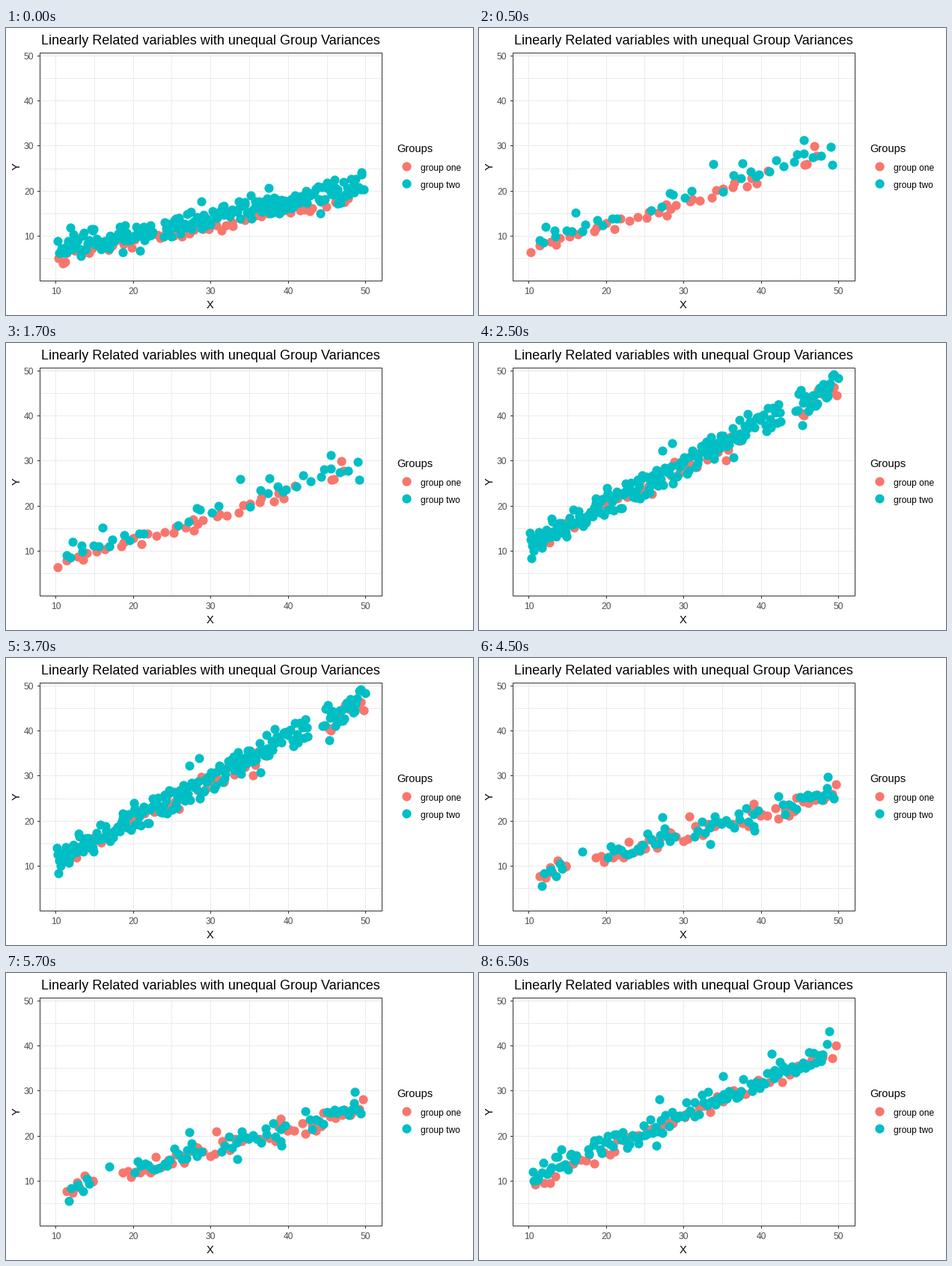
Recreate the animation shown at these times as a matplotlib script. Size 624 px wide and 384 px high, loop 8000 ms.

```python
import matplotlib.pyplot as plt
import numpy as np
from matplotlib.animation import FuncAnimation

W, H, DPI = 624, 384, 96
PX = 72 / DPI  # points per pixel
SALMON, TEAL = "#F8766D", "#00BFC4"
GRID, DARK, GREY = "#EBEBEB", "#333333", "#4D4D4D"
LEFT, RIGHT, TOP, BOTTOM = 45.5, 502.5, 33.5, 338.5
INTERVAL, LOOP, HOLD, LEAD = 500, 8000, 2000, 1500

plt.rcParams["font.family"] = "Liberation Sans"


def x_at(value):
    return 66.5 + 10.36 * (value - 10)


def y_at(value):
    return 278.7 - 6.04 * (value - 10)


def cloud(seed, n, start, end, spread, spans, extremes):
    """Stage positions of n values about a line from x = 10 to x = 50.

    x runs evenly, with jitter, through the spans; extremes are added as they are.
    """
    rng = np.random.default_rng(seed)
    lo, hi = np.array(spans, float).T
    ends = np.cumsum(hi - lo)
    along = (np.arange(n) + rng.random(n)) / n * ends[-1]
    k = np.searchsorted(ends, along, side="right")
    x = hi[k] - ends[k] + along
    y = start + (end - start) * (x - 10) / 40 + rng.triangular(-spread, 0, spread, n)
    points = np.vstack([np.column_stack([x, y]), extremes])
    return np.column_stack([x_at(points[:, 0]), y_at(points[:, 1])])


samples = [
    (cloud(1, 60, 5.5, 19.2, 1.8, [(10, 48)], [(10.9, 4), (47.2, 17.5)]),
     cloud(2, 200, 7.2, 21.2, 3.2, [(10.2, 22.6), (23.7, 49.8)],
           [(11.9, 11.9), (18.6, 6.4), (20.9, 6.8), (28.8, 17.7), (35.1, 19.1),
            (37.5, 20.7), (44.1, 15.1), (49.4, 23.7)])),
    (cloud(3, 36, 6.8, 28, 1.8, [(10.2, 41.3), (44.8, 47.5)],
           [(27.8, 14.6), (46.8, 30)]),
     cloud(4, 33, 8.2, 29.5, 2.2, [(10.5, 21.6), (25.2, 31.2), (35, 49)],
           [(12.2, 12.1), (16, 15.2), (33.8, 26), (37.6, 26.2), (45.5, 31.3),
            (49.1, 25.8)])),
    (cloud(5, 60, 11, 46.5, 2.5, [(10.5, 38), (45, 49.5)],
           [(35.4, 30.2), (49.7, 44.6)]),
     cloud(6, 200, 11.3, 47.8, 3.8, [(10, 42.5), (44.2, 49.4)],
           [(10.3, 8.5), (20.1, 24.1), (27.2, 32.3), (28.5, 34), (36.4, 30.8),
            (45.3, 37.9), (49.9, 48.3)])),
    (cloud(7, 54, 7.6, 26, 2.4, [(11, 15.3), (18, 34.5), (36, 49.5)],
           [(30.7, 21), (39, 23.8), (49.6, 28.2)]),
     cloud(8, 62, 8, 26.5, 3, [(11.8, 14.6), (20, 29.3), (31.3, 39.7), (41.8, 49.8)],
           [(11.7, 5.6), (16.9, 13.3), (27.2, 20.8), (33.4, 15), (39.1, 17.9),
            (48.6, 29.8)])),
    (cloud(9, 55, 9.5, 39.3, 2.2, [(10.2, 48)], [(49.1, 37.3), (49.6, 40.1)]),
     cloud(10, 112, 10.6, 39.6, 3, [(10.2, 16.6), (17.6, 37.8), (38.3, 48.2)],
           [(14.2, 17.1), (26.5, 17.9), (26.8, 28.1), (35, 33.3), (41.3, 38.3),
            (48.5, 40.4), (48.8, 43.2)])),
]

fig = plt.figure(figsize=(W / DPI, H / DPI), dpi=DPI, facecolor="white")
ax = fig.add_axes([0, 0, 1, 1], xlim=(0, W), ylim=(H, 0))
ax.axis("off")


def line(x, y, color, z=1):
    ax.plot(x, y, color=color, lw=PX, zorder=z, snap=False,
            solid_capstyle="butt", solid_joinstyle="miter")


def label(x, y, text, size, color="black", ha="left", va="baseline", rotation=0):
    ax.text(x, y, text, fontsize=size * PX, color=color, ha=ha, va=va,
            rotation=rotation)


def dots(x, y, color, z):
    return ax.scatter(x, y, s=(12.2 * PX) ** 2, color=color, lw=0, zorder=z,
                      snap=False)


for value in range(5, 51, 5):
    x, y = np.floor([x_at(value), y_at(value)]) + 0.5
    line((LEFT, RIGHT), (y, y), GRID)
    if value >= 10:
        line((x, x), (TOP, BOTTOM), GRID)
    if value % 10 == 0:
        line((LEFT - 3.5, LEFT), (y, y), DARK)
        line((x, x), (BOTTOM, BOTTOM + 3.5), DARK)
        label(37.5, y + 4.5, value, 12, GREY, "right")
        label(x, 356.5, value, 12, GREY, "center")

line((LEFT, RIGHT, RIGHT, LEFT, LEFT), (TOP, TOP, BOTTOM, BOTTOM, TOP), DARK, 5)

label(273, 22.5, "Linearly Related variables with unequal Group Variances",
      18, ha="center")
label(272.5, 375, "X", 14.67, ha="center")
label(14.5, 185.5, "Y", 14.67, ha="center", va="center", rotation=90)
label(522.5, 166, "Groups", 14.67)

groups = []
for y, name, color, z in ((185, "group one", SALMON, 3), (208, "group two", TEAL, 4)):
    dots(535, y, color, z)
    label(554.5, y + 6, name, 12)
    groups.append(dots([], [], color, z))


def draw(frame):
    sample = samples[(frame * INTERVAL + LEAD) // HOLD]
    for group, points in zip(groups, sample):
        group.set_offsets(points)
    return groups


anim = FuncAnimation(fig, draw, frames=LOOP // INTERVAL, interval=INTERVAL,
                     repeat=True, repeat_delay=0)
plt.show()
```
